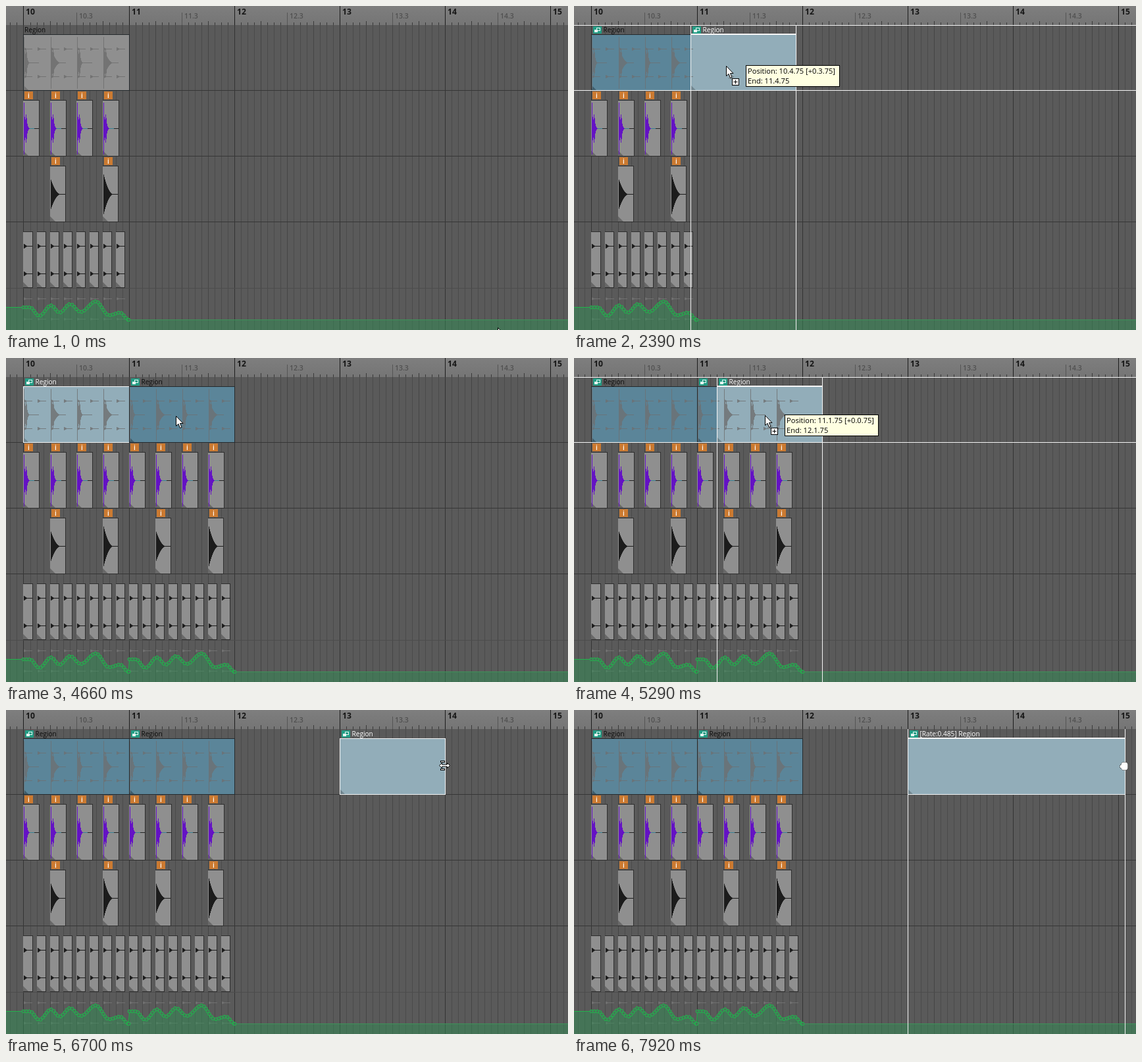
Recreate the animation shown at these times as an HTML page with a canvas. Size 854 by 493 pixels, loop 8 s.

```html
<!DOCTYPE html>
<html lang="en">
<head>
<meta charset="utf-8">
<title>Arrange view</title>
<style>
html, body { margin: 0; width: 100%; height: 100%; overflow: hidden; background: #5a5a5a; }
canvas { display: block; }
</style>
</head>
<body>
<canvas id="stage" width="854" height="493"></canvas>
<script>
const W = 854, H = 493, LOOP = 8000, BAR = 16;
const ctx = document.getElementById('stage').getContext('2d');
const UI = '"Open Sans", "Noto Sans", sans-serif';
const WHITE = '#f4f4f4', DARK = '#2e2e2e', INK = '#1c1c1c';

const SELECT = 1400, DRAG1 = 1610, DROP1 = 2820, DRAG2 = 4810, DROP2 = 6490, STRETCH = 7160;

// pointer moves: start, end, x, y at the end
const MOVES = [
  [60, 840, 220, 70], [840, 1380, 75, 84], [1760, 2570, 241, 91],
  [DROP1, 3510, 55, 88], [3970, 4330, 347, 92], [4330, 4700, 257, 88],
  [DRAG2, 5290, 289, 87], [5290, 5590, 460, 85], [5590, 6370, 577, 85],
  [DROP2, 6700, 666, 84], [STRETCH, 7920, 835, 85]
];

// turning points of the envelope in one bar: offset, y
const TURNS = [[0, 458], [10, 458], [24, 471], [42, 455], [55, 466], [71, 453],
  [87, 465], [110, 449], [130, 470], [147, 466], [160, 477]];

const gridX = n => Math.round(26.49 + 10.01 * n);   // n counts sixteenths from bar 10

function rect(x, y, w, h, color) {
  ctx.fillStyle = color;
  ctx.fillRect(x, y, w, h);
}
const vline = (x, y, h, color) => rect(x, y, 1, h, color);
const hline = (x, y, w, color) => rect(x, y, w, 1, color);

function frame(x, y, w, h, color) {
  ctx.strokeStyle = color;
  ctx.lineWidth = 1;
  ctx.strokeRect(x + .5, y + .5, w, h);
}
function text(str, x, y, size, color, weight = 400) {
  ctx.font = `${weight} ${size}px ${UI}`;
  ctx.fillStyle = color;
  ctx.fillText(str, x, y);
}
function poly(points, fill, stroke) {
  ctx.beginPath();
  points.forEach(([x, y]) => ctx.lineTo(x, y));
  ctx.closePath();
  ctx.fillStyle = fill;
  ctx.fill();
  if (stroke) {
    ctx.strokeStyle = stroke;
    ctx.lineWidth = 1;
    ctx.stroke();
  }
}
function circle(x, y, r) {
  ctx.beginPath();
  ctx.arc(x, y, r, 0, 2 * Math.PI);
}

function pointer(t) {
  let x = 747, y = 489;
  for (const [from, to, tx, ty] of MOVES) {
    if (t <= from) break;
    const k = Math.sin(Math.min(1, (t - from) / (to - from)) * Math.PI / 2);
    x += (tx - x) * k;
    y += (ty - y) * k;
  }
  return [Math.round(x), Math.round(y)];
}

function background() {
  rect(0, 0, W, H, '#5a5a5a');
  for (let n = -2; n < 84; n++) {
    vline(gridX(n), 29, H - 29, n % BAR === 0 ? '#343434' : n % 4 === 0 ? '#454545' : '#4b4b4b');
  }
  [128, 228, 328].forEach(y => hline(0, y, W, '#363636'));
  hline(0, 429, W, '#4c4c4c');
}

function ruler() {
  const shade = ctx.createLinearGradient(0, 0, 0, 29);
  shade.addColorStop(0, '#7e7e7e');
  shade.addColorStop(1, '#757575');
  rect(0, 0, W, 29, shade);
  for (let n = -2; n < 84; n++) {
    const x = gridX(n), bar = 10 + Math.floor(n / BAR);
    if (n % BAR === 0) {
      vline(x, 0, 29, INK);
      text(bar, x + 4, 13, 12.2, '#161616', 700);
    } else if (n > 0 && n % 8 === 0) {
      vline(x, 10, 19, '#555');
      text(bar + '.3', x + 4, 19, 10.5, '#505050', 600);
    } else {
      const tall = n % 4 === 0 ? 6 : 4;
      vline(x, 29 - tall, tall, '#3a3a3a');
    }
  }
}

function clipBox(x, y, w, h) {
  rect(x, y, w, h, '#8f8f8f');
  poly([[x, y + h - 8], [x + 8, y + h], [x, y + h]], '#686868');
  hline(x, y, w, DARK);
  hline(x, y + h, w + 1, DARK);
  vline(x + w, y, h, DARK);
}

// symmetric waveform, its half height given by level(distance)
function wave(x, mid, width, level, color) {
  for (let d = 1; d < width; d++) {
    const a = Math.max(.5, level(d - 1));
    rect(x + d, mid - a, 1, 2 * a, color);
  }
}
const bump = (d, at, spread) => Math.exp(-(((d - at) / spread) ** 2));
const kick = d => 39 * bump(d, 0, 1) + 20 * bump(d, 3, 1.5) + 4 * bump(d, 5, 2);
const snare = amp => d => amp * Math.max(0, 1 - d / 15) ** 2;
const hat = amp => d => amp * Math.max(0, 1 - d / 5);

function badge(x, y) {
  rect(x, y, 13, 12, '#cb7a31');
  text('i', x + 5, y + 10, 10, '#fff', 600);
}

function items(bars) {
  for (let n = 0; n < bars * BAR; n += 2) {
    const x = gridX(n);
    clipBox(x, 343, gridX(n + 1.35) - x, 85);
    [365.5, 407.5].forEach(y => wave(x, y, 14, hat(3.5), INK));
    [445.5, 476.5].forEach(y => wave(x, y, 14, hat(2), '#717171'));
    if (n % 4 === 0) {
      clipBox(x, 143, 24, 85);
      hline(x + 9, 186, 15, '#222');
      hline(x + 9, 186, 8, '#388094');
      wave(x, 186.5, 10, kick, '#6412c4');
      badge(x + 2, 130);
    }
    if (n % 8 === 4) {
      clipBox(x, 243, 23, 85);
      wave(x, 286.5, 23, snare(n % BAR === 4 ? 22 : 30), INK);
      badge(x + 2, 230);
    }
  }
}

function envelopeY(dx) {
  const i = Math.max(1, TURNS.findIndex(p => p[0] >= dx));
  const [x0, y0] = TURNS[i - 1], [x1, y1] = TURNS[i];
  return y0 + (y1 - y0) * (1 - Math.cos(Math.PI * (dx - x0) / (x1 - x0))) / 2;
}

function envelope(bars) {
  const end = gridX(bars * BAR), line = [], dots = [];
  for (let b = 0; b < bars; b++) {
    const x = gridX(b * BAR) + .5;
    let last = null;
    for (let dx = 0; dx <= 160; dx += .5) {
      const point = [x + dx, envelopeY(dx) + .5];
      line.push(point);
      if (!last || dx === 160 || Math.hypot(point[0] - last[0], point[1] - last[1]) >= 4.2) {
        dots.push(point);
        last = point;
      }
    }
  }
  poly([[0, 458], ...line, [end, 477], [W, 477], [W, H], [0, H]], 'rgba(50,140,85,.52)');
  hline(0, 458, 26, '#22b24c');
  hline(end, 477, W - end, '#3e9259');
  ctx.strokeStyle = '#1fb84b';
  ctx.lineWidth = 1;
  ctx.beginPath();
  line.forEach(([x, y]) => ctx.lineTo(x, y));
  ctx.stroke();
  for (const [x, y] of dots) {
    circle(x, y, 2.4);
    ctx.fillStyle = '#467358';
    ctx.fill();
    ctx.stroke();
  }
}

// small echo of all tracks, cut to the region's extent
function echo(x, w, bars, color) {
  ctx.save();
  ctx.beginPath();
  ctx.rect(x, 44, w, 84);
  ctx.clip();
  for (let n = 0; n < bars * BAR; n += 2) {
    const gx = gridX(n);
    [65.5, 107.5].forEach(y => wave(gx, y, 14, hat(2.5), color));
    if (n % 4 === 0) wave(gx, 86.5, 24, kick, color);
    if (n % 8 === 4) wave(gx, 86.5, 23, snare(22), color);
  }
  ctx.restore();
}

function region({ x, end, pooled, selected, dragged, cover = end, label = 'Region' }, bars) {
  const w = end - x;
  const fill = pooled ? (selected ? '#92adb9' : '#5b8599') : (selected ? '#b2b2b2' : '#8f8f8f');
  rect(x, 43, w, 85, fill);
  poly([[x, 120], [x + 8, 128], [x, 128]], pooled ? (selected ? '#71868f' : '#3f5d6c') : '#747474');
  echo(x, w, bars, pooled ? (selected ? '#757b7e' : '#69747a') : '#737373');
  frame(x, 43, w, 85, selected ? WHITE : '#252a2d');
  if (dragged) hline(x, 42, w, WHITE);
  if (pooled) {
    rect(x + 3, 31, 13, 11, '#229c84');
    frame(x + 8, 33, 5, 4, '#e4f4f0');
    rect(x + 5, 36, 5, 4, '#e4f4f0');
  }
  if (cover - x > 50) text(label, x + (pooled ? 18.5 : 2), 40, 10.1, selected ? '#fff' : '#0c0c0c');
}

function guides(x0, x1, across) {
  [x0, x1].forEach(x => vline(x, 29, H - 29, WHITE));
  if (across) [29, 128].forEach(y => hline(0, y, W, WHITE));
}

function stamp(n, base) {
  const hundredths = String(n % 4 * 25).padStart(2, '0');
  return `${base + Math.floor(n / BAR)}.${Math.floor(n % BAR / 4) + (base ? 1 : 0)}.${hundredths}`;
}
function tooltip(cx, cy, start, moved) {
  const x = cx + (moved ? 30 : 29), y = cy - 1, w = moved ? 142 : 93;
  rect(x, y, w, 32, '#ffffe1');
  frame(x, y, w, 32, '#000');
  const shift = moved ? ` [+${stamp(moved, 0)}]` : '';
  text(`Position: ${stamp(start, 10)}${shift}`, x + 3, y + 13, 11.1, '#000');
  text(`End: ${stamp(start + BAR, 10)}`, x + 3, y + 28, 11.1, '#000');
}

function arrow() {
  poly([[0, 0], [0, 15], [3.5, 11.8], [6, 18], [8.5, 17], [6, 11], [10.5, 11]], '#fff', '#000');
}
const cursors = {
  arrow,
  copy() {
    for (let i = 0; i < 28; i++) rect(3 + i % 7 + (i >> 2) % 2, 13 + (i >> 2), .9, .9, i % 2 ? '#000' : '#ddd');
    arrow();
    rect(9, 19, 10, 10, '#fff');
    frame(8.5, 18.5, 10, 10, '#000');
    rect(11, 23.5, 6, 1, '#000');
    rect(13.5, 21, 1, 6, '#000');
  },
  resize() {
    const half = [[-4, -1.5], [-4, -4], [-8, 0], [-4, 4], [-4, 1.5]];
    poly([...half, ...half.map(([x, y]) => [-x, -y])], '#fff', '#000');
    [-7, 5].forEach(y => {
      rect(-6, y, 6, 2, '#fff');
      frame(-6.5, y - .5, 6, 2, '#000');
    });
  },
  grip() {
    ctx.fillStyle = '#fff';
    ctx.strokeStyle = '#000';
    ctx.beginPath();
    ctx.roundRect(-4, -6, 10, 12, 4);
    ctx.roundRect(-6, -2, 8, 5, 2);
    ctx.stroke();
    ctx.fill();
  }
};
function cursor(kind, x, y) {
  ctx.save();
  ctx.translate(x + .5, y + .5);
  ctx.lineWidth = 1;
  cursors[kind]();
  ctx.restore();
}

function selection(t) {
  if (t < SELECT) return -1;
  if (t < DROP1) return 0;
  if (t >= DROP2) return 2;
  return t >= 3510 && t < 4700 ? 0 : 1;
}

function draw(t) {
  const [cx, cy] = pointer(t);
  const bars = t < DROP1 ? 1 : 2;
  const dragging = (t >= DRAG1 && t < DROP1) || (t >= DRAG2 && t < DROP2);
  const stretching = t >= STRETCH;
  const source = t < DROP1 ? 0 : BAR, grab = t < DROP1 ? 75 : 257;
  const moved = dragging ? Math.max(0, Math.floor((cx - grab) / 10)) : 0;
  const pooled = t >= DROP1 || moved > 0;
  const active = selection(t);
  const make = (n, more) => ({ x: gridX(n), end: gridX(n + BAR), pooled, ...more });

  const regions = [];
  for (let b = 0; b < bars; b++) {
    const held = dragging && b * BAR === source;
    regions.push(make(b * BAR, {
      selected: b === active && !moved,
      dragged: held && !moved,
      cover: gridX(held && moved ? source + Math.min(moved, BAR) : (b + 1) * BAR)
    }));
  }
  if (moved) regions.push(make(source + moved, { selected: true, dragged: true }));
  if (t >= DROP2) {
    const steps = BAR + (stretching ? Math.round((cx - 666) / 10) : 0);
    regions.push(make(3 * BAR, {
      selected: true,
      dragged: stretching,
      end: gridX(3 * BAR + steps),
      label: (steps > BAR ? `[Rate:${(BAR / steps).toFixed(3)}] ` : '') + 'Region'
    }));
  }

  background();
  items(bars);
  envelope(bars);
  regions.forEach(r => region(r, bars));
  ruler();

  const top = regions.at(-1);
  if (dragging) {
    const start = source + moved;
    guides(gridX(start), gridX(start + BAR), true);
    tooltip(cx, cy, start, moved);
  } else if (stretching) {
    guides(top.x, top.end, false);
  }
  cursor(dragging ? 'copy' : stretching ? 'grip' : t >= 6640 ? 'resize' : 'arrow', cx, cy);
}

const began = performance.now();
function tick() {
  draw((performance.now() - began) % LOOP);
  requestAnimationFrame(tick);
}
tick();
</script>
</body>
</html>
```
